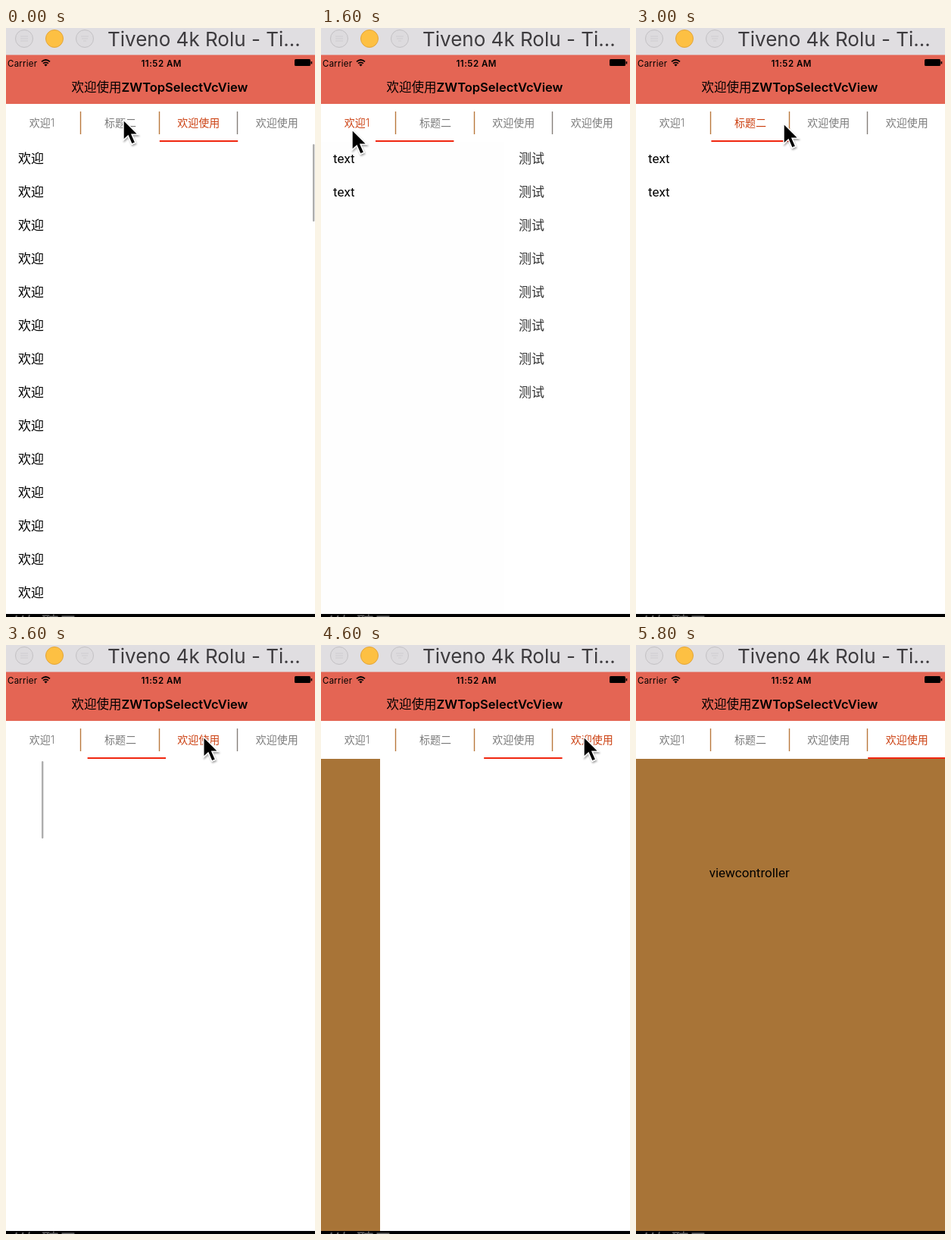
An HTML page for the animation above (6000 ms loop, 408 by 776 pixels).

```html
<!DOCTYPE html>
<html lang="zh">
<head>
<meta charset="utf-8">
<title>Tab view demo</title>
<style>
  html, body { margin: 0; width: 100%; height: 100%; overflow: hidden; background: #fff; }
  svg { display: block; width: 408px; height: 776px; }
  text { font-family: Inter, "Noto Sans CJK SC", "Noto Sans CJK", sans-serif; white-space: pre; }
  .status { font-size: 11.5px; letter-spacing: .25px; }
  .clock { font-weight: 600; letter-spacing: .5px; text-anchor: middle; }
  .nav { font-size: 16.5px; font-weight: 600; text-anchor: middle; }
  .nav .cjk { font-weight: 500; }
  .tab { font-size: 14px; font-weight: 300; text-anchor: middle; }
  .cell { font: 17px Roboto, "Noto Sans CJK SC", "Noto Sans CJK", sans-serif; }
</style>
</head>
<body>
<svg viewBox="0 0 408 776">
  <defs>
    <clipPath id="area"><rect y="150" width="408" height="622"/></clipPath>
    <filter id="soft" x="-50%" y="-50%" width="200%" height="200%">
      <feDropShadow dx="1" dy="2" stdDeviation="1.2" flood-opacity=".35"/>
    </filter>
  </defs>
  <rect width="408" height="776" fill="#fff"/>

  <!-- window bar -->
  <rect width="408" height="36" fill="#e0dee1"/>
  <g fill="#dddbde" stroke="#c3c1c4">
    <circle cx="24" cy="14" r="11.5"/>
    <circle cx="64" cy="14" r="11.5" fill="#fdc043" stroke="#e2a53a"/>
    <circle cx="104" cy="14" r="11.5"/>
    <path d="M19 11h10M19 14h10M19 17h10M99 11h10M100 14h8M102 17h4" stroke="#cfcdd0"/>
  </g>
  <text x="134" y="24" font-size="26" fill="#3d3b3e">Tiveno 4k Rolu - Ti...</text>

  <!-- status and navigation bar -->
  <rect y="35.5" width="408" height="64.5" fill="#e46554"/>
  <text class="status" x="2" y="51">Carrier</text>
  <g fill="none" stroke="#000" stroke-width="1.7">
    <path d="M47 44.3q5.5-4.6 11 0M49 46.7q3.5-2.8 7 0"/>
    <path d="M50.3 48.2q2.2-1.6 4.4 0L52.5 50.4z" fill="#000" stroke="none"/>
  </g>
  <text class="status clock" x="205.2" y="51">11:52 AM</text>
  <rect x="381" y="41" width="21" height="9" rx="1.5"/>
  <rect x="402.6" y="44" width="1.6" height="3.5" rx=".6"/>
  <text class="nav" x="203" y="84"><tspan class="cjk">欢迎使用</tspan>ZWTopSelectVcView</text>

  <g id="tabs"></g>
  <g id="pages" clip-path="url(#area)"></g>
  <rect id="line" y="148" width="103.4" height="2" fill="#f0260f"/>

  <rect y="772" width="408" height="4"/>
  <text x="7" y="792" font-size="23" font-weight="500" fill="#666">//与聽用</text>

  <g id="cursor" filter="url(#soft)">
    <path d="M0 1V27.5L6.2 22L11 33L15.8 31L11 20.3H19.3Z" stroke="#fff" stroke-width="1.4"/>
  </g>
</svg>
<script>
const LOOP = 6000, STEP = 200, SLIDE = 600, WIDTH = 408, PITCH = 103.4;
const byId = id => document.getElementById(id);

function add(parent, tag, attrs, text) {
  const el = document.createElementNS('http://www.w3.org/2000/svg', tag);
  for (const key in attrs) el.setAttribute(key, attrs[key]);
  if (text) el.textContent = text;
  parent.append(el);
  return el;
}

const tabs = ['欢迎1', '标题二', '欢迎使用', '欢迎使用'].map((label, i) =>
  add(byId('tabs'), 'text', { class: 'tab', x: 47.5 + PITCH * i, y: 130 }, label));
const seps = [98.5, 202.5, 305.5].map(x =>
  add(byId('tabs'), 'rect', { x: x - 0.7, y: 110, width: 1.4, height: 30, fill: '#b9783c' }));

function makePage(label, rows, ink = '#000', fill = '#fff', x = 16, y = 178) {
  const el = add(byId('pages'), 'g');
  add(el, 'rect', { y: 150, width: WIDTH, height: 622, fill });
  const body = add(el, 'g');
  for (let i = 0; i < rows; i++) add(body, 'text', { class: 'cell', x, y: y + 44 * i, fill: ink }, label);
  return { el, body };
}
const pages = [
  makePage('测试', 8, '#333'),
  makePage('text', 2),
  makePage('欢迎', 14),
  makePage('viewcontroller', 1, '#000', '#a87437', 96.7, 306)
];
const bar = add(pages[2].body, 'rect', { x: 405, y: 153, width: 2.4, height: 102, rx: 1.2, fill: '#adadad' });
const dim = add(byId('pages'), 'rect', { y: 150, width: WIDTH, height: 622 });

// start time, page left, page entered
const moves = [[-SLIDE, 1, 2], [270, 2, 1], [1336, 1, 0], [2300, 0, 1], [3466, 1, 2], [4432, 2, 3]];
// time, x, y of the pointer tip
const path = [[0, 155, 120], [800, 155, 121], [1250, 41, 133], [1900, 41, 133], [2250, 150, 124],
  [2600, 170, 124], [3000, 195, 125], [3450, 245, 121], [4000, 303, 117], [4400, 347, 120],
  [4900, 347, 120], [5300, 425, 105]];
// slide progress to underline progress
const lag = [[0, 0], [0.4, 0.25], [0.57, 0.495], [0.664, 0.62], [0.966, 0.94], [1, 1]];

function track(points, at, col = 1) {
  const i = points.findIndex(p => p[0] > at);
  if (i < 0) return points[points.length - 1][col];
  const a = points[i - 1], b = points[i];
  return a[col] + (b[col] - a[col]) * (at - a[0]) / (b[0] - a[0]);
}

function draw(t) {
  const [start, from, to] = moves.filter(m => m[0] <= t).pop();
  const u = Math.min(1, (t - start) / SLIDE);
  const p = u * u * (3 - 2 * u);
  const forward = to > from, moving = p < 1;
  const x = Math.round((forward ? -1 : 1) * WIDTH * (1 - p));

  pages.forEach((page, i) => {
    page.el.style.display = i === to || (moving && i === from) ? '' : 'none';
    page.el.setAttribute('transform', `translate(${i === to ? x : 0} 0)`);
    const shift = i === to && moving ? (forward ? -2 : 4) : 0;
    page.body.setAttribute('transform', `translate(${i === 3 ? 0 : shift} 0)`);
  });
  byId('pages').append(pages[from].el, dim, pages[to].el);
  dim.setAttribute('opacity', moving ? Math.max(0, (p - 0.4) / 0.6) ** 1.53 : 0);
  bar.style.display = to === 2 ? '' : 'none';

  const q = track(lag, p);
  byId('line').setAttribute('x', -4 + PITCH * (from + (to - from) * q));
  tabs.forEach((tab, i) => tab.setAttribute('fill', i === to ? '#cc4112' : '#7c7c7c'));
  seps[2].setAttribute('fill', to === 3 ? '#b9783c' : '#857f7a');
  byId('cursor').setAttribute('transform', `translate(${track(path, t)} ${track(path, t, 2)})`);
}

const begin = performance.now();
function tick() {
  const t = (performance.now() - begin) % LOOP;
  draw(Math.floor(t / STEP) * STEP);
  requestAnimationFrame(tick);
}
tick();
</script>
</body>
</html>
```
